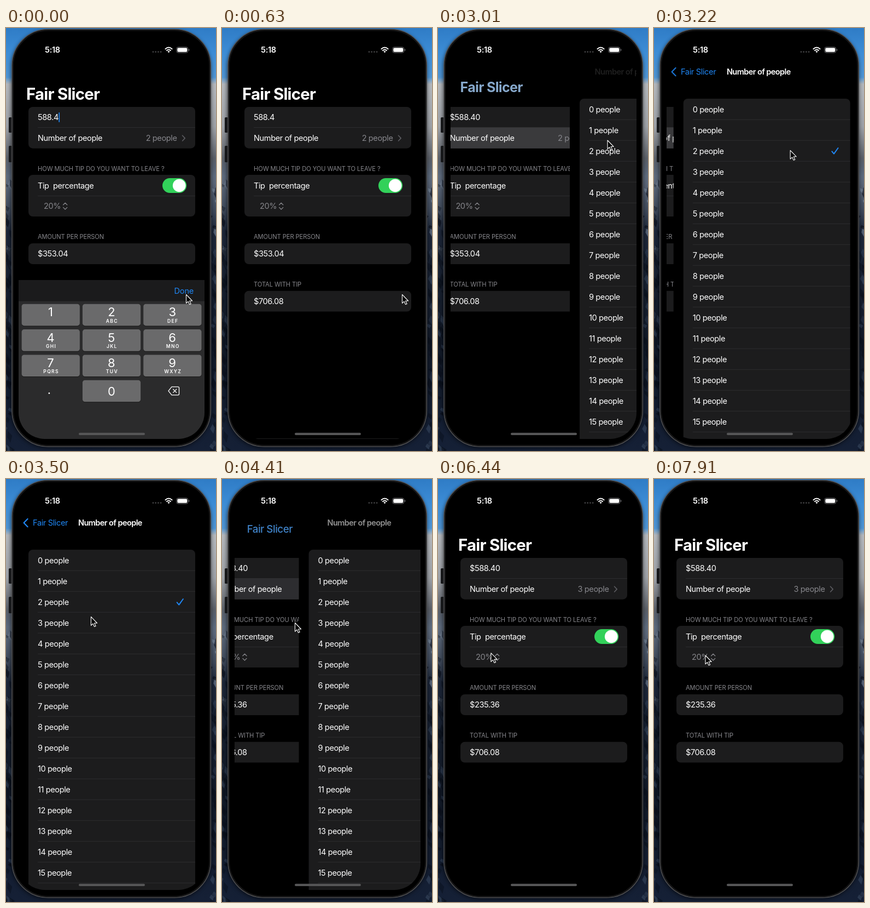
Animation of 384x772 px, one loop 8 s. Source, as an HTML page:

```html
<!DOCTYPE html>
<html lang="en">
<head>
<meta charset="utf-8">
<title>Fair Slicer</title>
<style>
  html, body { margin: 0; width: 100%; height: 100%; overflow: hidden; background: #000; }
  svg { display: block; width: 100%; height: 100%; }
  text { font-family: Inter, Roboto, sans-serif; white-space: pre; }
  .body { font-size: 14.6px; letter-spacing: -.42px; fill: #fff; }
  .dim { fill: #87878c; }
  .head { font-size: 11.2px; letter-spacing: -.11px; fill: #86868b; }
  .nav { font-size: 14.6px; font-weight: 600; letter-spacing: -.62px; fill: #fff; }
  .digit { font-size: 22px; fill: #fff; text-anchor: middle; }
  .abc { font-size: 8.6px; font-weight: 600; letter-spacing: 1.3px; fill: #fff; text-anchor: middle; }
  .line { fill: none; stroke-linecap: round; stroke-linejoin: round; }
</style>
</head>
<body>
<svg id="stage" viewBox="0 0 384 772"></svg>
<script>
const LOOP = 8000, STEP = 70;
const CARD = '#1c1c1d', BLUE = '#1f87f5';

// Markup helpers
const rect = (x, y, w, h, fill, r = 0, more = '') =>
  `<rect x="${x}" y="${y}" width="${w}" height="${h}" rx="${r}" fill="${fill}" ${more}/>`;
const text = (x, mid, cls, str, more = '') => {
  const drop = { head: 4, abc: 3.1, digit: 8 }[cls] || 5.3;
  return `<text x="${x}" y="${mid + drop}" class="${cls}" ${more}>${str}</text>`;
};
const line = (d, color, width, more = '') =>
  `<path class="line" d="${d}" stroke="${color}" stroke-width="${width}" ${more}/>`;
const rule = y => rect(58, y, 288, .7, '#343437');

function seeded(seed) {
  return () => (seed = (seed * 16807) % 2147483647) / 2147483647;
}

function wallpaper() {
  const rnd = seeded(41);
  let s = rect(0, 0, 384, 772, 'url(#sky)') + rect(0, 90, 384, 180, 'url(#cloud)');
  for (let i = 0; i < 90; i++) {
    const x = rnd() < .5 ? rnd() * 12 - 4 : 372 + rnd() * 12;
    const y = 270 + rnd() * 500, h = 6 + rnd() * 20;
    const color = rnd() < .65 ? '#090f1a' : y < 400 ? '#8291a6' : '#34435a';
    s += `<path d="M${x} ${y}l${4 + rnd() * 6} ${h * .4}l-3 ${h * .6}l-6 ${-h * .5}z" fill="${color}" opacity="${.3 + rnd() * .4}"/>`;
  }
  return s;
}

function phone() {
  return rect(9, 4, 366, 763, '#000', 68, 'opacity=".55" filter="url(#soft)"')
    + rect(5, 163, 6, 28, '#17181a', 1.5)
    + rect(5, 215, 6, 30, '#17181a', 1.5)
    + rect(11, 2.3, 363.3, 761.7, '#000', 66, 'stroke="#505052" stroke-width="1.6"')
    + rect(13.2, 4.5, 358.9, 757.3, '#000', 63.8, 'stroke="#1b1b1c" stroke-width="1.4"');
}

function statusBar() {
  let s = text(71, 40, 'nav', '5:18', 'style="letter-spacing:-.3px"');
  for (let i = 0; i < 4; i++) s += `<circle cx="${269 + i * 4.7}" cy="43.6" r="1.4" fill="#434345"/>`;
  s += line('M291.4 38.2Q297.5 32.9 303.6 38.2M293.9 41Q297.5 37.9 301.1 41', '#fff', 1.9);
  s += '<path d="M297.5 45.2l-2.2-2.4q2.2-1.7 4.4 0z" fill="#fff"/>';
  s += rect(311.8, 34.8, 21, 10.4, 'none', 3.3, 'stroke="#77777a" stroke-width=".9"');
  s += rect(313.3, 36.3, 18, 7.4, '#fff', 2) + rect(333.9, 38.2, 1.3, 3.6, '#77777a', .7);
  return s;
}

function mainPage() {
  return rect(41, 144, 305, 75.7, CARD, 8)
    + '<path id="press" d="M41 181.5H346V211.7a8 8 0 0 1-8 8H49a8 8 0 0 1-8-8z" fill="#3a3a3c"/>'
    + rule(181) + text(58, 163, 'body', '', 'id="bill"')
    + rect(96.4, 154, 1.7, 18, BLUE, .8, 'id="caret"')
    + text(58, 201, 'body', 'Number of people')
    + text(312.5, 201, 'body dim', '', 'id="count" text-anchor="end"')
    + line('M322.6 196.2l4.6 4.9-4.6 4.9', '#5b5b60', 1.6)
    + text(58, 256.5, 'head', 'HOW MUCH TIP DO YOU WANT TO LEAVE ?')
    + rect(41, 268, 305, 76, CARD, 8) + rule(306)
    + text(58, 287.5, 'body', 'Tip\u00a0 percentage')
    + rect(286, 274, 44.2, 27, '#32d15a', 13.5)
    + '<circle cx="316.7" cy="287.5" r="11.8" fill="#fff"/>'
    + text(69, 325, 'body dim', '20%')
    + line('M104.6 322.8l3.6-3.6 3.6 3.6M104.6 327.4l3.6 3.6 3.6-3.6', '#87878c', 1.3)
    + text(58, 381, 'head', 'AMOUNT PER PERSON')
    + rect(41, 393, 305, 38, CARD, 8) + text(58, 412, 'body', '', 'id="share"')
    + text(58, 467.5, 'head', 'TOTAL WITH TIP')
    + rect(41, 479.7, 305, 37.8, CARD, 8) + text(58, 498.5, 'body', '$706.08');
}

function listPage() {
  let s = rect(23, 10, 345, 745, '#000') + rect(41, 129, 305, 660, CARD, 8);
  for (let i = 0; i < 17; i++)
    s += text(58, 148.4 + i * 38, 'body', i + ' people') + rule(166.8 + i * 38);
  return s + line('M312.6 225.2l3.7 4.4 7.6-10.6', BLUE, 2, 'id="check"');
}

function keyboard() {
  const letters = ['', 'ABC', 'DEF', 'GHI', 'JKL', 'MNO', 'PQRS', 'TUV', 'WXYZ'];
  const key = (x, y) => rect(x, y + 1, 106.3, 39.6, '#171717', 4.5) + rect(x, y, 106.3, 39.6, '#6a6a6b', 4.5);
  let s = rect(23, 460, 341, 300, '#2b2b2c') + rect(23, 460, 341, 38.5, '#1b1b1c')
    + text(307.5, 480, 'body', 'Done', `style="fill:${BLUE};letter-spacing:-.2px"`);
  letters.forEach((abc, i) => {
    const x = 28.6 + i % 3 * 111.3, y = 503.8 + Math.floor(i / 3) * 46.3;
    s += key(x, y) + text(x + 53, y + 14.5, 'digit', i + 1) + text(x + 54, y + 30.6, 'abc', abc);
  });
  return s + key(139.9, 642.7) + text(193, 662.5, 'digit', '0') + text(79, 659.5, 'digit', '.')
    + line('M303 654.8h11.5a2 2 0 0 1 2 2v11a2 2 0 0 1-2 2H303l-6-7.4z', '#fff', 1.3)
    + line('M305.6 659.2l6.2 6.2m0-6.2l-6.2 6.2', '#fff', 1.3);
}

const stops = list => list.map(([at, c, o = 1]) =>
  `<stop offset="${at}" stop-color="${c}" stop-opacity="${o}"/>`).join('');
const stage = document.getElementById('stage');
stage.innerHTML = `<defs>
  <linearGradient id="sky" x2="0" y2="1">${stops([[0, '#2f7cc6'], [.06, '#3d8dd6'], [.12, '#4f95d4'],
    [.3, '#5f7187'], [.36, '#5d697b'], [.43, '#3f4a5b'], [.48, '#1c2638'], [.75, '#111927'], [1, '#152036']])}</linearGradient>
  <linearGradient id="cloud" x2="0" y2="1">${stops([[0, '#b9bec4', 0], [.07, '#b4b8bd'], [.5, '#9da1a7'], [.82, '#5b6068'], [1, '#4c535d', 0]])}</linearGradient>
  <filter id="soft"><feGaussianBlur stdDeviation="3.5"/></filter>
  <clipPath id="screen"><rect x="23" y="14" width="340" height="736" rx="48"/></clipPath>
</defs>
${wallpaper()}${phone()}
<g clip-path="url(#screen)">
  <g id="main">${mainPage()}</g>
  <g id="list">${listPage()}</g>
  ${line('M39.6 72.8l-7 7.2 7 7.2', BLUE, 2.2, 'id="back"')}
  <text id="title">Fair Slicer</text>
  ${text(132, 80, 'nav', 'Number of people', 'id="heading"')}
  <g id="keys">${keyboard()}</g>
</g>
${statusBar()}
${rect(133, 738.8, 121, 4.2, '#565657', 2.1)}
<path id="pointer" d="M0 0V15.8L3.5 12.5 6.1 18 8.6 16.9 6.1 11.5H11.1Z" fill="#000" stroke="#fff" stroke-width="1.1" stroke-linejoin="round"/>`;

const el = {};
stage.querySelectorAll('[id]').forEach(n => el[n.id] = n);
const set = (node, attrs) => { for (const k in attrs) node.setAttribute(k, attrs[k]); };
const shift = (x, y) => `translate(${x} ${y})`;
const mix = (a, b, p) => a + (b - a) * p;
const clamp = v => Math.min(1, Math.max(0, v));
const smooth = p => p * p * (3 - 2 * p);

// Critically damped spring from 0 to 1
function spring(ms) {
  if (ms <= 0) return 0;
  const x = ms * .01826, p = 1 - Math.exp(-x) * (1 + x);
  return p > .998 ? 1 : p;
}

// Pointer stops: time, x, y
const trail = [
  [1190, 329.5, 486.5], [1540, 306, 362], [1820, 316, 258.5],
  [1960, 316, 258.5], [2310, 288, 227], [2590, 310, 205],
  [3010, 310, 205], [3500, 155.5, 251.5], [3850, 133.5, 262.5],
  [5740, 133.5, 262.5], [6580, 94, 322]
];
function pointerAt(t) {
  const i = trail.findIndex(s => s[0] > t);
  if (i === 0) return trail[0].slice(1);
  if (i < 0) return trail[trail.length - 1].slice(1);
  const [a, b] = [trail[i - 1], trail[i]];
  const p = smooth((t - a[0]) / (b[0] - a[0]));
  return [mix(a[1], b[1], p), mix(a[2], b[2], p)];
}

function draw(t) {
  const push = t < 4300 ? spring(t - 2941) : 1 - spring(t - 4343);
  const s = smooth(push);
  const chosen = t >= 4200;

  el.bill.textContent = t < 2730 ? '588.4' : '$588.40';
  el.count.textContent = chosen ? '3 people' : '2 people';
  el.share.textContent = chosen ? '$235.36' : '$353.04';
  set(el.caret, { opacity: t < 350 ? 1 : 0 });
  set(el.press, { opacity: t < 2800 ? 0 : 1 - clamp((t - 4270) / 350) });
  set(el.check, { transform: shift(0, chosen ? 38 : 0) });

  set(el.main, { transform: shift(-102 * push, 0) });
  set(el.list, { transform: shift(340 * (1 - push), 0) });
  set(el.back, { opacity: clamp((push - .75) * 4) });
  set(el.heading, { transform: shift(219 * (1 - s), 0), opacity: s ** 1.75 });

  const size = mix(29.4, 14.6, s), tint = s ** .75;
  const rgb = [31, 135, 245].map(c => Math.round(mix(255, c, tint)));
  set(el.title, {
    x: mix(37, 49, s), y: mix(120, 80, s) + size * .36,
    'font-size': size, 'font-weight': Math.round(700 - 300 * s * s),
    'letter-spacing': -.026 * size,
    fill: `rgb(${rgb})`, opacity: 1 - .9 * s * (1 - s)
  });

  set(el.keys, { transform: shift(0, 300 * spring(t - 350)) });
  set(el.pointer, { transform: shift(...pointerAt(t)) });
}

function tick() {
  const t = performance.now() % LOOP;
  draw(Math.floor(t / STEP) * STEP);
  requestAnimationFrame(tick);
}
tick();
</script>
</body>
</html>
```
